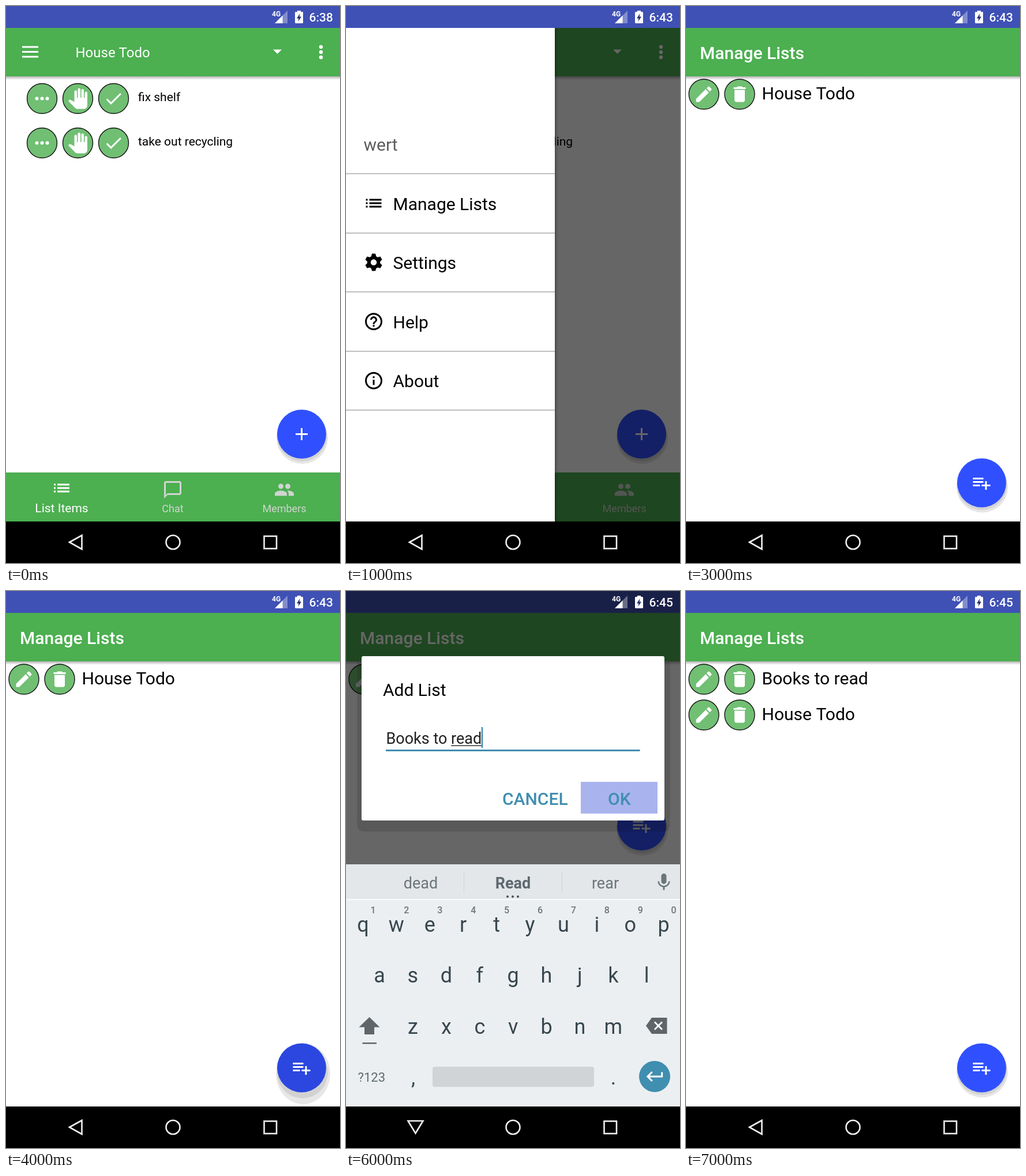
An HTML page with a canvas that plays this animation: 579x966 px, repeating every 8 s.

```html
<!DOCTYPE html>
<html lang="en">
<head>
<meta charset="utf-8">
<title>Todo lists</title>
<style>
html, body { margin: 0; width: 100%; height: 100%; overflow: hidden; background: #fff; }
canvas { display: block; }
</style>
</head>
<body>
<canvas id="stage" width="579" height="966"></canvas>
<script>
const W = 579, H = 966;
const ctx = document.getElementById('stage').getContext('2d');
const GREEN = '#4caf50', INDIGO = '#3f51b5', BLUE = '#3050ff', TEAL = '#408eb0', MUTED = '#cfd5cf';

// Icons on a 24-unit grid
const gear = () => {
  const p = new Path2D();
  const at = (r, deg) => p.lineTo(12 + r * Math.cos(deg * Math.PI / 180), 12 + r * Math.sin(deg * Math.PI / 180));
  for (let a = -90; a < 270; a += 60) {
    at(7.5, a - 22.5);
    at(10.2, a - 11.3);
    at(10.2, a + 11.3);
    at(7.5, a + 22.5);
  }
  p.closePath();
  p.moveTo(15.5, 12);
  p.arc(12, 12, 3.5, 0, 7);
  return p;
};
const RING = 'M12 2C6.48 2 2 6.48 2 12s4.48 10 10 10 10-4.48 10-10S17.52 2 12 2zm0 18c-4.41 0-8-3.59-8-8s3.59-8 8-8 8 3.59 8 8-3.59 8-8 8z';
const ICONS = {
  add: new Path2D('M19 13h-6v6h-2v-6H5v-2h6V5h2v6h6z'),
  hand: new Path2D('M23 5.5V20c0 2.2-1.8 4-4 4h-7.3c-1.08 0-2.1-.43-2.85-1.19L1 14.83s1.26-1.23 1.3-1.25c.22-.19.49-.29.79-.29.22 0 .42.06.6.16.04.01 4.31 2.46 4.31 2.46V4c0-.83.67-1.5 1.5-1.5S11 3.17 11 4v7h1V1.5c0-.83.67-1.5 1.5-1.5S15 .67 15 1.5V11h1V2.5c0-.83.67-1.5 1.5-1.5s1.5.67 1.5 1.5V11h1V5.5c0-.83.67-1.5 1.5-1.5s1.5.67 1.5 1.5z'),
  check: new Path2D('M9 16.17L4.83 12l-1.42 1.41L9 19 21 7l-1.41-1.41z'),
  list: new Path2D('M3 13h2v-2H3zM3 17h2v-2H3zM3 9h2V7H3zM7 13h14v-2H7zM7 17h14v-2H7zM7 7v2h14V7z'),
  chat: new Path2D('M20 2H4c-1.1 0-2 .9-2 2v18l4-4h14c1.1 0 2-.9 2-2V4c0-1.1-.9-2-2-2zm0 14H6l-2 2V4h16z'),
  group: new Path2D('M16 11c1.66 0 2.99-1.34 2.99-3S17.66 5 16 5s-3 1.34-3 3 1.34 3 3 3zm-8 0c1.66 0 2.99-1.34 2.99-3S9.66 5 8 5 5 6.34 5 8s1.34 3 3 3zm0 2c-2.33 0-7 1.17-7 3.5V19h14v-2.5c0-2.33-4.67-3.5-7-3.5zm8 0c-.29 0-.62.02-.97.05 1.16.84 1.97 1.97 1.97 3.45V19h6v-2.5c0-2.33-4.67-3.5-7-3.5z'),
  gear: gear(),
  help: new Path2D(RING + 'M11 18h2v-2h-2zM12 6c-2.21 0-4 1.79-4 4h2c0-1.1.9-2 2-2s2 .9 2 2c0 2-3 1.75-3 5h2c0-2.25 3-2.5 3-5 0-2.21-1.79-4-4-4z'),
  info: new Path2D(RING + 'M11 17h2v-6h-2zM11 9h2V7h-2z'),
  trash: new Path2D('M6 19c0 1.1.9 2 2 2h8c1.1 0 2-.9 2-2V7H6zM19 4h-3.5l-1-1h-5l-1 1H5v2h14z'),
  pencil: new Path2D('M3 17.25V21h3.75L17.81 9.94l-3.75-3.75zM20.71 7.04c.39-.39.39-1.02 0-1.41l-2.34-2.34c-.39-.39-1.02-.39-1.41 0l-1.83 1.83 3.75 3.75z'),
  addList: new Path2D('M14 10H2v2h12zM14 6H2v2h12zM18 14v-4h-2v4h-4v2h4v4h2v-4h4v-2zM2 16h8v-2H2z'),
  mic: new Path2D('M12 14c1.66 0 3-1.34 3-3V5c0-1.66-1.34-3-3-3S9 3.34 9 5v6c0 1.66 1.34 3 3 3zm5.3-3c0 3-2.54 5.1-5.3 5.1S6.7 14 6.7 11H5c0 3.41 2.72 6.23 6 6.72V21h2v-3.28c3.28-.48 6-3.3 6-6.72z'),
  enter: new Path2D('M19 7v4H5.83l3.58-3.59L8 6l-6 6 6 6 1.41-1.41L5.83 13H21V7z')
};

function rect(x, y, w, h, color) {
  ctx.fillStyle = color;
  ctx.fillRect(x, y, w, h);
}
function rounded(x, y, w, h, r, color) {
  ctx.fillStyle = color;
  ctx.beginPath();
  ctx.roundRect(x, y, w, h, r);
  ctx.fill();
}
function oval(x, y, rx, ry, color) {
  ctx.fillStyle = color;
  ctx.beginPath();
  ctx.ellipse(x, y, rx, ry, 0, 0, 7);
  ctx.fill();
}
const dot = (x, y, r, color) => oval(x, y, r, r, color);
function trace(points) {
  ctx.beginPath();
  points.forEach(([x, y]) => ctx.lineTo(x, y));
  ctx.closePath();
}
function poly(points, color) {
  trace(points);
  ctx.fillStyle = color;
  ctx.fill();
}
function icon(name, x, y, color) {
  ctx.save();
  ctx.translate(x - 18, y - 18);
  ctx.scale(1.5, 1.5);
  ctx.fillStyle = color;
  ctx.fill(ICONS[name], 'evenodd');
  ctx.restore();
}
function text(str, x, y, size, color, weight = 400, align = 'left') {
  ctx.font = `${weight} ${size}px Roboto, sans-serif`;
  ctx.textAlign = align;
  ctx.fillStyle = color;
  ctx.fillText(str, x, y);
}
const centred = (str, x, y, size, color, weight) => text(str, x, y, size, color, weight, 'center');
const dim = (x, y, w, h) => rect(x, y, w, h, 'rgba(0,0,0,.6)');

function statusIcons(time) {
  text('4G', 461, 18, 12, '#fff', 700);
  poly([[466, 30], [488, 30], [488, 8]], 'rgba(255,255,255,.35)');
  poly([[466, 30], [479.5, 30], [479.5, 16.5]], '#fff');
  rect(505, 8, 6, 4, '#fff');
  rounded(501, 10, 14, 20, 1.5, '#fff');
  poly([[509.5, 13], [504, 21.5], [507.3, 21.5], [506.5, 27], [512, 18.5], [508.7, 18.5]], '#27336f');
  text(time, 525.5, 27, 21, '#fff', 500);
}
function toolbar() {
  rect(0, 0, W, H, '#fff');
  rect(0, 0, W, 38, INDIGO);
  rect(0, 38, W, 84, GREEN);
  const shade = ctx.createLinearGradient(0, 122, 0, 128);
  shade.addColorStop(0, 'rgba(0,0,0,.3)');
  shade.addColorStop(1, 'rgba(0,0,0,0)');
  rect(0, 122, W, 6, shade);
}
function navBar(keyboardOpen) {
  rect(0, 894, W, 72, '#000');
  ctx.strokeStyle = '#f0f0f0';
  ctx.lineWidth = 2.6;
  trace(keyboardOpen ? [[107.5, 919], [133.5, 919], [120.5, 940.5]] : [[110, 930], [131.5, 918], [131.5, 942]]);
  ctx.stroke();
  ctx.beginPath();
  ctx.arc(289.5, 930, 12, 0, 7);
  ctx.stroke();
  ctx.strokeRect(447.5, 919.5, 21.5, 21.5);
}
function disc(x, y) {
  dot(x, y, 26, '#70bf73');
  ctx.strokeStyle = '#111';
  ctx.lineWidth = 1.4;
  ctx.stroke();
}
function fab(y, name, pressed) {
  if (pressed) {
    oval(515, y + 10, 47, 53, '#e7e7e7');
    oval(514, y + 8, 44, 45, '#d2d2d2');
  } else {
    dot(513.5, y + 7, 44.5, '#e6e6e6');
    dot(513, y + 3.5, 43.5, '#d3d3d3');
  }
  dot(512.5, y, 42.5, pressed ? '#2b47e0' : BLUE);
  icon(name, 512.5, y, '#fff');
}

function home() {
  toolbar();
  [69.5, 78, 86.5].forEach(y => rect(28, y, 28, 3, '#fff'));
  text('House Todo', 120.5, 89, 24, '#fff');
  poly([[463, 75.5], [478, 75.5], [470.5, 83]], '#fff');
  [71, 80, 89].forEach(y => dot(546, y, 3.2, '#fff'));
  ['fix shelf', 'take out recycling'].forEach((item, i) => {
    const y = 160.5 + 77 * i;
    [62.5, 124.5, 186.5].forEach(x => disc(x, y));
    [-9, 0, 9].forEach(dx => dot(62.5 + dx, y, 3, '#fff'));
    icon('hand', 124.5, y, '#fff');
    icon('check', 186.5, y, '#fff');
    text(item, 229, y + 4.5, 21, '#000');
  });
  fab(742.5, 'add');
  rect(0, 809, W, 85, GREEN);
  icon('list', 96.5, 836, '#fff');
  centred('List Items', 96.5, 878, 21, '#fff');
  icon('chat', 289, 839, MUTED);
  centred('Chat', 289, 878, 18, MUTED);
  icon('group', 482.5, 839, MUTED);
  centred('Members', 482.5, 878, 18, MUTED);
  navBar();
}

function drawer(pressed) {
  home();
  dim(362, 38, W - 362, 856);
  const shade = ctx.createLinearGradient(362, 0, 368, 0);
  shade.addColorStop(0, 'rgba(0,0,0,.25)');
  shade.addColorStop(1, 'rgba(0,0,0,0)');
  rect(362, 38, 6, 856, shade);
  rect(0, 38, 362, 856, '#fff');
  text('wert', 30.5, 251, 30, '#5c5c5c');
  if (pressed) rect(0, 291, 362, 102, '#d6dcff');
  const items = [['list', 'Manage Lists'], ['gear', 'Settings'], ['help', 'Help'], ['info', 'About']];
  items.forEach(([name, label], i) => {
    const y = 342 + 102.6 * i;
    icon(name, 48, y, '#000');
    text(label, 81.5, y + 11.5, 30, '#000');
  });
  for (let i = 0; i < 5; i++) rect(0, Math.round(290 + 102.6 * i), 362, 1.5, '#acacac');
}

function manage(lists, pressed, fabY = 827) {
  toolbar();
  text('Manage Lists', 24, 92, 30, '#fff', 500);
  lists.forEach((name, i) => {
    const y = 153 + 62 * i;
    disc(31, y);
    disc(93, y);
    icon('pencil', 31, y, '#fff');
    icon('trash', 93, y, '#fff');
    text(name, 131.5, y + 9, 30, '#000');
  });
  fab(fabY, 'addList', pressed);
  navBar();
}

function keyboard(typed) {
  const ink = '#37474f', soft = '#6c757a', keyTone = typed ? '#5f6568' : '#9ea5aa';
  rect(0, 474, W, 420, '#eceff1');
  rect(0, 474, W, 60, '#e3e7e9');
  rect(0, 534, W, 2, '#fafbfb');
  [204, 374].forEach(x => rect(x, 487, 1, 37, '#cfd4d7'));
  icon('mic', 551, 505, soft);
  if (typed) {
    centred('dead', 129.5, 516, 27, soft);
    centred('Read', 289.5, 516, 27, '#5f696e', 700);
    centred('rear', 449.5, 516, 27, soft);
    [280, 289, 298].forEach(x => dot(x, 530, 2, '#455055'));
  }
  const pitch = W / 10;
  [['qwertyuiop', 29.5, 591], ['asdfghjkl', 58, 679], ['zxcvbnm', 116, 768]].forEach(([keys, x, y]) =>
    [...keys].forEach((key, i) => centred(key, x + pitch * i, y, 36, ink)));
  [...'1234567890'].forEach((key, i) => centred(key, 47 + pitch * i, 559, 16, soft, 500));

  poly([[40.5, 739], [58.5, 756.5], [49, 756.5], [49, 769], [32, 769], [32, 756.5], [22.5, 756.5]], keyTone);
  rect(28.5, 783, 24.5, 2.5, keyTone);
  poly([[520, 754], [530, 740], [556.5, 740], [556.5, 768], [530, 768]], keyTone);
  ctx.strokeStyle = '#fff';
  ctx.lineWidth = 2.8;
  ctx.beginPath();
  [1, -1].forEach(s => {
    ctx.moveTo(535, 754 - 6.5 * s);
    ctx.lineTo(548, 754 + 6.5 * s);
  });
  ctx.stroke();

  text('?123', 20.5, 851, 22, '#5f6b71');
  centred(',', 116.5, 856, 36, ink);
  rounded(150, 825, 280, 35, 4, '#d0d4d7');
  centred('.', 463.5, 856, 36, ink);
  dot(535, 842, 27, TEAL);
  icon('enter', 535.7, 842, '#fff');
}

function dialog(value) {
  manage(['House Todo'], false, 407.5);
  dim(0, 0, W, 894);
  ctx.save();
  ctx.beginPath();
  ctx.rect(0, 123, W, 400);
  ctx.clip();
  rounded(19.5, 105, 542, 312, 10, 'rgba(0,0,0,.13)');
  ctx.restore();
  rounded(27, 113, 525, 285, 3, '#fff');
  text('Add List', 64, 181.5, 30, '#000');
  let caret = 69.5;
  if (value) {
    text(value, 69.5, 265, 27, '#212121');
    const head = value.slice(0, value.lastIndexOf(' ') + 1);
    const start = 69.5 + ctx.measureText(head).width;
    const end = 69.5 + ctx.measureText(value).width;
    rect(start, 267.5, end - start, 1.5, '#333');
    caret = end - .5;
    rect(407, 331, 133, 55, '#a9b4ee');
  } else {
    text('List name (ex: Grocery Shopping)', 69.5, 265, 27, '#757575');
  }
  rect(caret, 236, 2.5, 36, TEAL);
  rect(69, 275, 440.5, 3, TEAL);
  text('CANCEL', 271, 370.5, 30, TEAL, 500);
  text('OK', 454, 370.5, 30, TEAL, 500);
  keyboard(Boolean(value));
  navBar(true);
}

const SCENES = [
  ['6:38', home],
  ['6:43', () => drawer(false)],
  ['6:43', () => drawer(true)],
  ['6:43', () => manage(['House Todo'])],
  ['6:43', () => manage(['House Todo'], true)],
  ['6:43', () => dialog('')],
  ['6:45', () => dialog('Books to read')],
  ['6:45', () => manage(['Books to read', 'House Todo'])]
];
const SCENE_MS = 1000;
const start = performance.now();

function draw() {
  const elapsed = Math.max(0, performance.now() - start);
  const [time, scene] = SCENES[Math.floor(elapsed / SCENE_MS) % SCENES.length];
  scene();
  statusIcons(time);
  requestAnimationFrame(draw);
}
draw();
</script>
</body>
</html>
```
